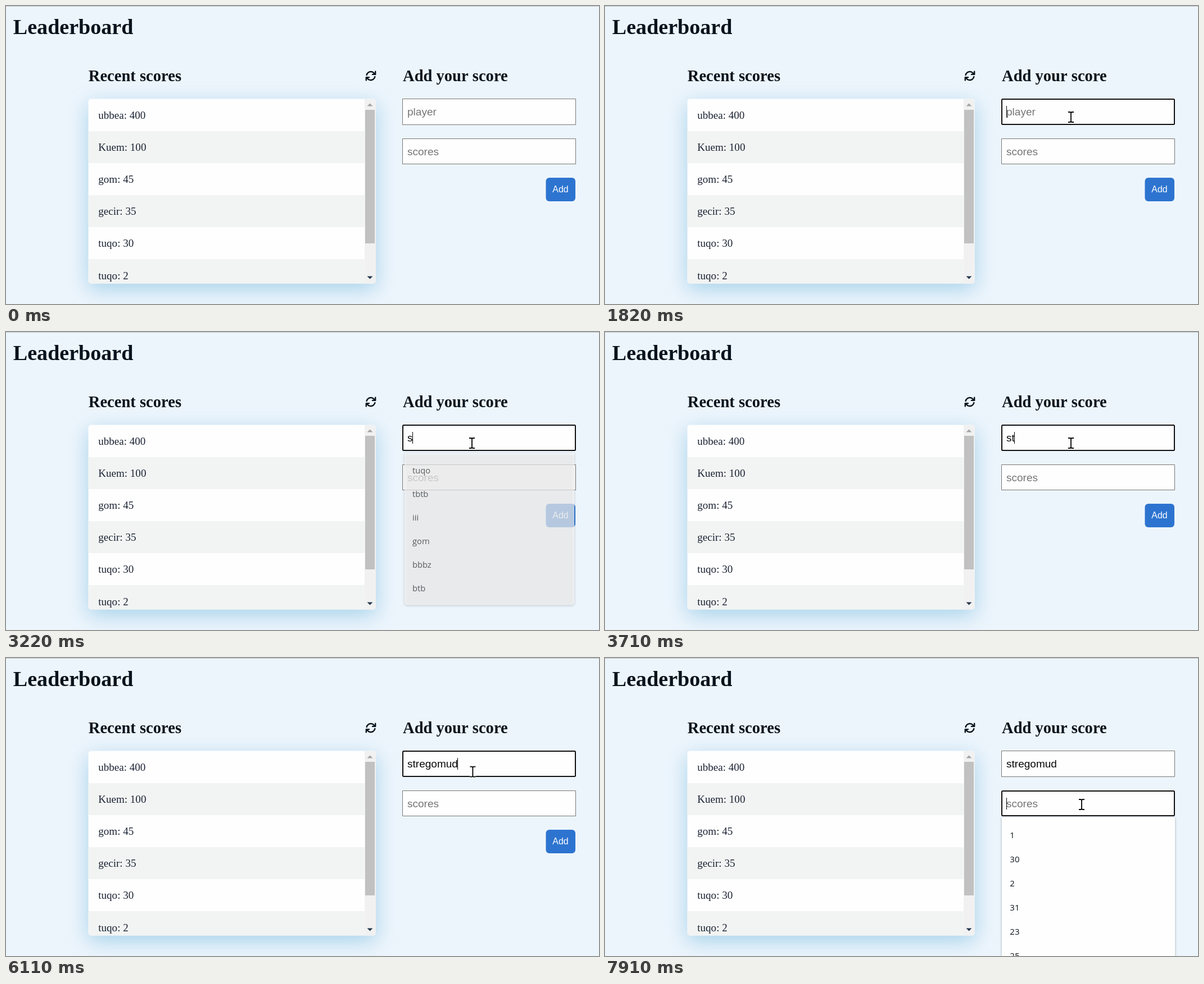
Recreate the animation shown at these times as an HTML page with a canvas. Size 1055 by 531 pixels, loop 8000 ms.

```html
<!DOCTYPE html>
<html lang="en">
<head>
<meta charset="utf-8">
<title>Leaderboard</title>
<style>
  html, body { margin: 0; width: 100%; height: 100%; overflow: hidden; background: #edf5fc; }
  canvas { display: block; }
</style>
</head>
<body>
<canvas id="stage" width="1055" height="531"></canvas>
<script>
const ctx = document.getElementById('stage').getContext('2d');
const LOOP = 8000;
const SERIF = '"Liberation Serif", serif';
const SANS = '"Liberation Sans", sans-serif';
const INPUT_FONT = '19.05px ' + SANS;
const LEFT = 714;

const scores = ['ubbea: 400', 'Kuem: 100', 'gom: 45', 'gecir: 35', 'tuqo: 30', 'tuqo: 2'];
const playerHints = ['tuqo', 'tbtb', 'iii', 'gom', 'bbbz', 'btb'];
const scoreHints = ['1', '30', '2', '31', '23', '25'];
const playerName = 'stregomud';
const keyTimes = [3160, 3710, 3920, 4370, 4710, 4910, 5170, 5440, 5640];

const playerField = { y: 165, h: 47, baseline: 195, caretY: 178, hint: 'player' };
const scoreField = { y: 236, h: 46, baseline: 266, caretY: 249, hint: 'scores' };

const between = (t, from, to) => t >= from && t < to;

// Progress in n equal jumps: the first at `from`, the last at `to`.
function stepped(t, from, to, n) {
  if (t < from) return 0;
  return Math.min(n, Math.floor((t - from) / (to - from) * (n - 1) + 1.001)) / n;
}

function rect(x, y, w, h, color) {
  ctx.fillStyle = color;
  ctx.fillRect(x, y, w, h);
}

function rounded(x, y, w, h, r) {
  ctx.beginPath();
  ctx.roundRect(x, y, w, h, r);
}

function polygon(points, color) {
  ctx.beginPath();
  points.forEach(([x, y]) => ctx.lineTo(x, y));
  ctx.closePath();
  ctx.fillStyle = color;
  ctx.fill();
}

function text(str, x, y, font, color) {
  ctx.font = font;
  ctx.fillStyle = color;
  ctx.fillText(str, x, y);
}

function withShadow(color, blur, dy, draw) {
  ctx.save();
  ctx.shadowColor = color;
  ctx.shadowBlur = blur;
  ctx.shadowOffsetY = dy;
  draw();
  ctx.restore();
}

function drawRefreshIcon() {
  ctx.save();
  ctx.translate(649, 124.5);
  ctx.strokeStyle = '#08131c';
  ctx.lineWidth = 2.4;
  ctx.lineCap = ctx.lineJoin = 'round';
  for (let half = 0; half < 2; half++) {
    ctx.beginPath();
    ctx.arc(0, 0, 7.5, Math.PI * 1.06, Math.PI * 1.84);
    ctx.moveTo(8.2, -7.8);
    ctx.lineTo(8.2, -2.6);
    ctx.lineTo(3, -2.6);
    ctx.stroke();
    ctx.rotate(Math.PI);
  }
  ctx.restore();
}

function drawScoreList() {
  ctx.save();
  rounded(146.5, 165.5, 511.5, 329, 5);
  withShadow('rgba(42,150,205,.36)', 36, 10, () => {
    ctx.fillStyle = '#fefefe';
    ctx.fill();
  });
  ctx.clip();
  scores.forEach((line, i) => {
    const top = 165.5 + i * 57.15;
    if (i % 2) rect(146, Math.round(top), 492, 57, '#f2f4f3');
    text(line, 164.3, Math.round(top + 35.3), '19.05px ' + SERIF, '#1a2232');
  });
  rect(638, 165, 20, 330, '#f1f1f1');
  rect(639, 185, 17, 238, '#c1c1c1');
  polygon([[642.5, 178.5], [647.5, 173.5], [652.5, 178.5]], '#a3a3a3');
  polygon([[642.5, 481.5], [647.5, 486.5], [652.5, 481.5]], '#26384c');
  ctx.restore();
}

function drawField(field, value, focused, hovered) {
  const { y, h } = field;
  rect(705, y, 309, h, '#fefefe');
  ctx.lineWidth = focused ? 2 : 1;
  ctx.strokeStyle = focused ? '#101010' : hovered ? '#4f4f4f' : '#767676';
  if (focused) rounded(706, y + 1, 307, h - 2, 1.5);
  else rounded(705.5, y + .5, 308, h - 1, 0);
  ctx.stroke();
  text(value || field.hint, LEFT, field.baseline, INPUT_FONT, value ? '#080808' : '#757575');
}

function drawCaret(field, value) {
  ctx.font = INPUT_FONT;
  rect(Math.floor(LEFT + ctx.measureText(value).width), field.caretY, 1, 21, '#000');
}

function drawSpellingMark(width) {
  ctx.beginPath();
  for (let x = 0; x <= width; x += 2) ctx.lineTo(LEFT + x, x % 4 ? 196.3 : 198.5);
  ctx.strokeStyle = '#e8323c';
  ctx.lineWidth = 1.1;
  ctx.stroke();
}

function drawHints(hints, top, opacity = 1, scale = 1) {
  ctx.save();
  ctx.globalAlpha = opacity;
  ctx.translate(860, top + 139);
  ctx.scale(scale, scale);
  ctx.translate(-860, -top - 139);
  rounded(706, top, 308, 276, [0, 0, 5, 5]);
  withShadow('rgba(0,0,0,.3)', 4, 1, () => {
    ctx.fillStyle = '#fefefe';
    ctx.fill();
  });
  hints.forEach((hint, i) =>
    text(hint, 720.3, top + 37 + i * 42.9, '15px "Open Sans", "Noto Sans", sans-serif', '#10151a'));
  ctx.restore();
}

function pointerAt(t) {
  const enter = stepped(t, 320, 750, 7);
  const rise = stepped(t, 1010, 1220, 4);
  const drop = stepped(t, 6110, 6460, 6);
  const ease = p => p * p * (3 - 2 * p);
  const out = 1 - (1 - enter) ** 2;
  return {
    x: 862 - 9 * out - 24 * ease(rise) + 19 * ease(drop),
    y: 590 - 316 * out - 76 * ease(rise) + 63 * ease(drop),
    visible: enter > 0
  };
}

const isOver = (field, p) => p.visible && p.y >= field.y && p.y < field.y + field.h;

function drawTextPointer() {
  ctx.beginPath();
  for (const s of [-1, 1]) {
    ctx.moveTo(-5, 9 * s);
    ctx.lineTo(-2, 9 * s);
    ctx.quadraticCurveTo(0, 9 * s, 0, 7 * s);
    ctx.quadraticCurveTo(0, 9 * s, 2, 9 * s);
    ctx.lineTo(5, 9 * s);
  }
  ctx.moveTo(0, -8);
  ctx.lineTo(0, 8);
  for (const [width, color] of [[3.4, '#fff'], [1.8, '#000']]) {
    ctx.lineWidth = width;
    ctx.strokeStyle = color;
    ctx.stroke();
  }
}

function drawArrowPointer() {
  polygon([[0, 0], [0, 17], [4, 13.5], [6.5, 19.5], [9.3, 18.3], [6.8, 12.5], [12, 12.3]], '#fff');
  ctx.lineWidth = 1;
  ctx.strokeStyle = '#000';
  ctx.stroke();
}

function drawPointer(p) {
  if (!p.visible) return;
  ctx.save();
  ctx.translate(p.x, p.y);
  if (isOver(playerField, p) || isOver(scoreField, p)) drawTextPointer();
  else drawArrowPointer();
  ctx.restore();
}

function render(t) {
  const typed = playerName.slice(0, keyTimes.filter(k => t >= k).length);
  const playerFocus = between(t, 1820, 6930);
  const scoreFocus = t >= 6930;
  const pointer = pointerAt(t);

  rect(0, 0, 1055, 531, '#edf5fc');
  rect(0, 0, 1055, 1, '#b9c0c7');
  text('Leaderboard', 12.8, 50, 'bold 38.1px ' + SERIF, '#08131c');
  text('Recent scores', 146.8, 134, 'bold 28.57px ' + SERIF, '#08131c');
  text('Add your score', 706, 134, 'bold 28.57px ' + SERIF, '#08131c');
  drawRefreshIcon();
  drawScoreList();

  drawField(playerField, typed, playerFocus, isOver(playerField, pointer));
  drawField(scoreField, '', scoreFocus, isOver(scoreField, pointer));
  rounded(960.5, 306, 52.5, 42, 6);
  ctx.fillStyle = '#2d74d0';
  ctx.fill();
  text('Add', 972.3, 332, '15.87px ' + SANS, '#fff');

  if (between(t, 6730, 6930)) drawSpellingMark(90);
  const playerBlink = between(t, 2350, 2880) || between(t, 6170, 6730);
  if (playerFocus && !playerBlink) drawCaret(playerField, typed);
  if (scoreFocus && !between(t, 7460, 7910)) drawCaret(scoreField, '');

  if (between(t, 1900, 3360)) {
    const fade = t < 3220 ? 0 : t < 3290 ? 1 : 2;
    drawHints(playerHints, 213, 1 - fade / 3, 1 - fade * .019);
  }
  if (scoreFocus) drawHints(scoreHints, 284);
  drawPointer(pointer);
}

const start = performance.now();
function tick() {
  render((performance.now() - start) % LOOP);
  requestAnimationFrame(tick);
}
tick();
</script>
</body>
</html>
```
